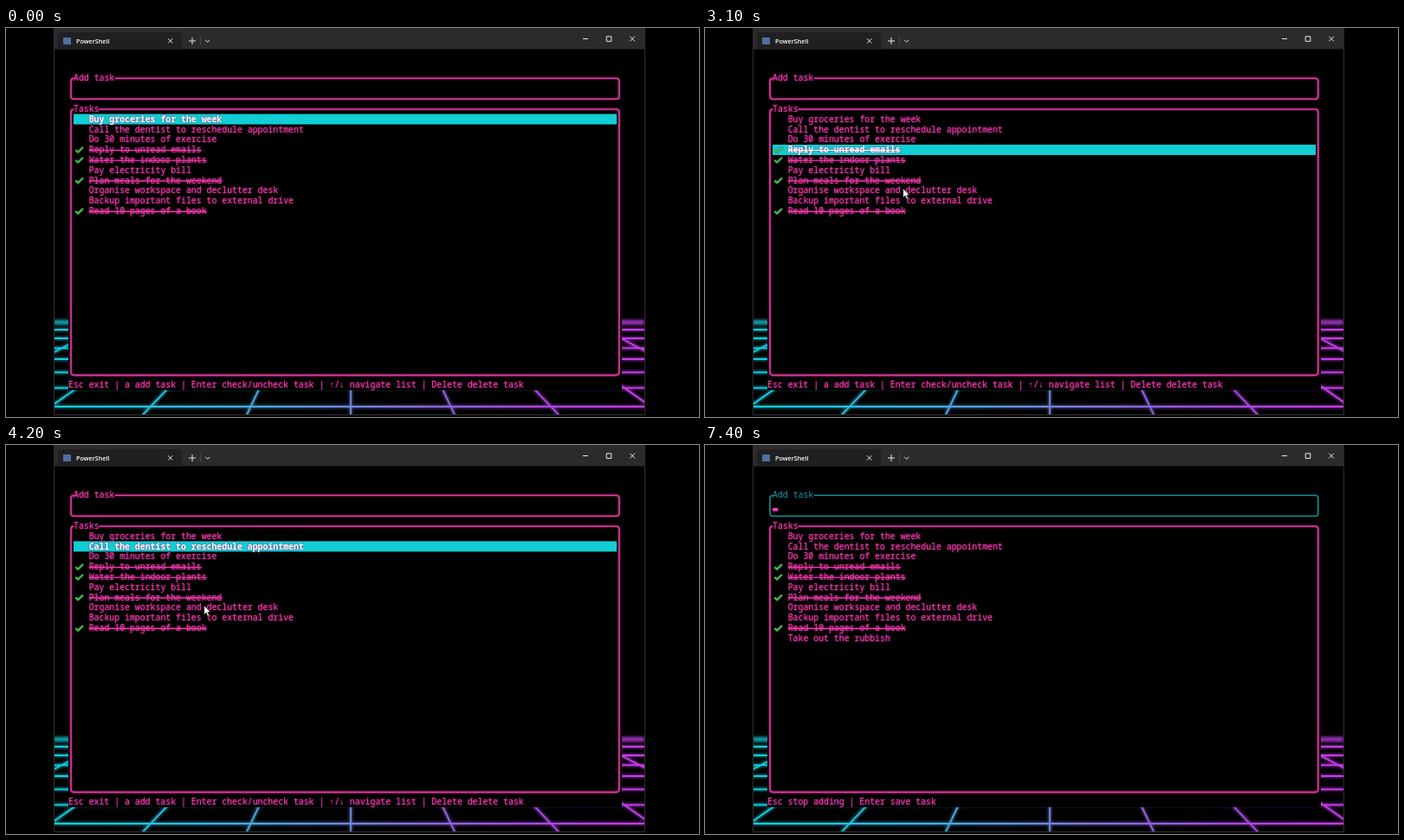
An HTML page for the animation above (8 s loop, 800 by 450 pixels).

```html
<!DOCTYPE html>
<html lang="en">
<head>
<meta charset="utf-8">
<title>Task list</title>
<style>
  html, body { margin: 0; width: 100%; height: 100%; overflow: hidden; background: #000; }
  svg { display: block; width: 800px; height: 450px; }
  text { white-space: pre; }
  .term { font: 500 9.85px "Noto Sans Mono", "DejaVu Sans Mono", monospace; fill: #f53fae; }
  .glow { filter: drop-shadow(0 0 1px #b0207a); }
  .panel { fill: none; stroke: #e03a9f; stroke-width: 1.6; }
  .strike { stroke: #f53fae; stroke-width: 1.1; }
  .check { fill: none; stroke: #1fd63c; stroke-width: 2; }
  .selected text { fill: #fff; font-weight: 700; }
  .selected .strike { stroke: #fff; }
  .adding .panel { stroke: #128d94; }
  .adding .term { fill: #149aa0; }
  .chrome { fill: none; stroke: #e8e8e8; stroke-width: 1; }
</style>
</head>
<body>
<svg id="stage" viewBox="0 0 800 450">
  <defs>
    <linearGradient id="neon" gradientUnits="userSpaceOnUse" x1="55" y1="0" x2="737" y2="0">
      <stop offset="0" stop-color="#10cfdc"/>
      <stop offset=".28" stop-color="#3cb4e0"/>
      <stop offset=".55" stop-color="#7c7ce0"/>
      <stop offset=".8" stop-color="#a74ce2"/>
      <stop offset="1" stop-color="#c83cec"/>
    </linearGradient>
    <filter id="soft" filterUnits="userSpaceOnUse" x="0" y="300" width="800" height="150">
      <feGaussianBlur stdDeviation="1.7"/>
    </filter>
    <clipPath id="floorClip"><rect x="55.5" y="333" width="681.5" height="114"/></clipPath>
  </defs>
  <rect width="800" height="450"/>

  <g clip-path="url(#floorClip)" fill="none" stroke="url(#neon)">
    <path class="floor" stroke-width="4" opacity=".55" filter="url(#soft)"/>
    <path class="floor" stroke-width="1.8"/>
    <rect x="55" y="337.5" width="682" height="6" fill="url(#neon)" stroke="none" opacity=".75" filter="url(#soft)"/>
  </g>
  <rect x="72" y="330" width="639" height="89"/>

  <path d="M55.5 0V447.5H737.5V0" fill="none" stroke="#303030"/>
  <rect x="55" width="683" height="24.5" fill="#2b2b2b"/>
  <path d="M57 24.5Q60 24.5 60 21V9Q60 5 64 5H199Q203 5 203 9V21Q203 24.5 206 24.5Z" fill="#202020"/>
  <rect x="66" y="11" width="9" height="8" fill="#4f6f9f"/>
  <text x="81" y="17.7" fill="#fff" style="font:600 7.2px 'Open Sans','Noto Sans',sans-serif">PowerShell</text>
  <path class="chrome" d="M187 12.2l5.4 5.4m0-5.4l-5.4 5.4M211 15h8M215 11v8M230.2 13.8l2.5 2.5l2.5-2.5M666 12.5h6M693.2 9.8h5.6v5.6h-5.6zM720.3 9.7l5.6 5.6m0-5.6l-5.6 5.6"/>
  <path d="M224.5 10v10" stroke="#484848"/>

  <g id="input" class="glow">
    <path class="panel" d="M125.5 58.3H704.5Q707.8 58.3 707.8 61.6V79Q707.8 82.3 704.5 82.3H78.3Q75 82.3 75 79V61.6Q75 58.3 78.3 58.3"/>
    <text class="term" x="78" y="61.4">Add task</text>
  </g>
  <rect id="caret" class="glow" x="78.2" y="73" width="6" height="3.4" fill="#f53fae"/>

  <g class="glow">
    <path class="panel" d="M107.5 94H704.5Q707.8 94 707.8 97.3V398.3Q707.8 401.6 704.5 401.6H78.3Q75 401.6 75 398.3V97.3Q75 94 78.3 94"/>
    <text class="term" x="78" y="96.9">Tasks</text>
    <text class="term" id="help" x="72" y="416.1"></text>
  </g>
  <rect id="bar" x="78" width="627" height="12" fill="#10ced3"/>
  <g id="list" class="glow"></g>
  <path id="pointer" d="M228.7 185.6V196.3L231.1 194L232.8 197.9L234.6 197.1L232.9 193.4H236Z" fill="#fff" stroke="#000" stroke-width=".6"/>
</svg>
<script>
const LOOP = 8000, COL = 5.91, ROW = 11.82, FIRST = 105.5;
const ADD_MODE = 4700, SAVED = 5900, POINTER = 1600;
const HELP = [
  "Esc exit | a add task | Enter check/uncheck task | ↑/↓ navigate list | Delete delete task",
  "Esc stop adding | Enter save task"
];
// A leading "*" marks a finished task.
const TASKS = [
  "Buy groceries for the week",
  "Call the dentist to reschedule appointment",
  "Do 30 minutes of exercise",
  "*Reply to unread emails",
  "*Water the indoor plants",
  "Pay electricity bill",
  "*Plan meals for the weekend",
  "Organise workspace and declutter desk",
  "Backup important files to external drive",
  "*Read 10 pages of a book",
  "Take out the rubbish"
];
// [time, value] steps
const SELECT = [[0, 0], [1600, 1], [2900, 2], [3100, 3], [3400, 4], [3700, 3], [3900, 2], [4100, 1], [ADD_MODE, -1]];
const CARET = [[0, 0], [ADD_MODE, 1], [5400, 0], [SAVED, 1], [6600, 0], [7200, 1]];

const $ = id => document.getElementById(id);
const at = (steps, t) => steps.filter(s => s[0] <= t).pop()[1];
const show = (el, on) => el.setAttribute("visibility", on ? "visible" : "hidden");

function add(parent, tag, attrs) {
  const el = document.createElementNS("http://www.w3.org/2000/svg", tag);
  for (const k in attrs) el.setAttribute(k, attrs[k]);
  return parent.appendChild(el);
}

function floorPath() {
  const cx = 398, vanish = 195, slope = 0.4755;
  let d = [349, 359, 370.3, 383, 398.3, 416.3, 438].map(y => `M55 ${y}H737.01`).join("");
  for (let k = -4; k <= 4; k++) {
    const x = y => cx + k * slope * (y - vanish);
    d += `M${x(341)} 341L${x(448)} 448`;
  }
  return d;
}
document.querySelectorAll(".floor").forEach(p => p.setAttribute("d", floorPath()));

const rows = TASKS.map((task, i) => {
  const done = task[0] === "*", label = task.replace("*", "");
  const y = FIRST + i * ROW, g = add($("list"), "g", {});
  add(g, "text", { class: "term", x: 95.7, y: y + 3.2 }).textContent = label;
  if (done) {
    add(g, "path", { class: "strike", d: `M95.7 ${y + .5}h${label.length * COL}` });
    add(g, "path", { class: "check", d: `M80.3 ${y + .2}l2.8 2.5l5.8-5.6` });
  }
  return g;
});

function draw(t) {
  const sel = at(SELECT, t), adding = t >= ADD_MODE;
  rows.forEach((g, i) => g.setAttribute("class", i === sel ? "selected" : ""));
  show(rows[10], t >= SAVED);
  show($("bar"), sel >= 0);
  $("bar").setAttribute("y", FIRST - 6 + Math.max(sel, 0) * ROW);
  show($("caret"), at(CARET, t));
  show($("pointer"), t >= POINTER && !adding);
  $("input").setAttribute("class", adding ? "adding" : "glow");
  const help = HELP[+adding];
  if ($("help").textContent !== help) $("help").textContent = help;
}

const start = performance.now();
function tick() {
  draw((performance.now() - start) % LOOP);
  requestAnimationFrame(tick);
}
tick();
</script>
</body>
</html>
```
